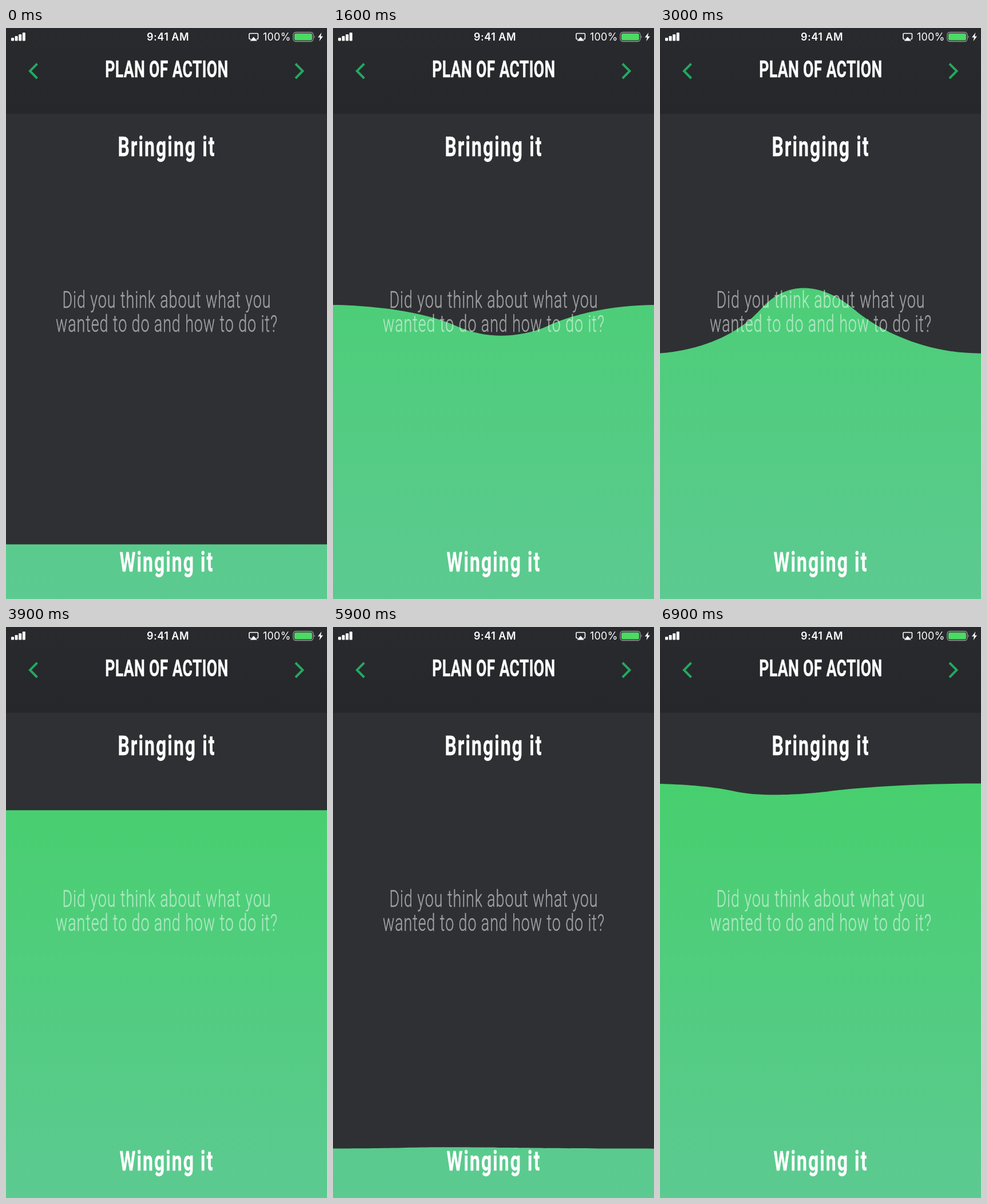
An HTML page that plays this animation: 561x998 px, repeating every 7 s.

```html
<!DOCTYPE html>
<html lang="en">
<head>
<meta charset="utf-8">
<title>Plan of action</title>
<style>
  html, body { margin: 0; width: 100%; height: 100%; overflow: hidden; background: #2f3033; }
  svg { display: block; width: 100vw; height: 100vh; }
  text { fill: #fff; text-anchor: middle; }
  .status { font: 400 18px Inter, sans-serif; letter-spacing: .2px; }
  .time { font-weight: 600; letter-spacing: .5px; }
  .label { font-family: Roboto, sans-serif; font-weight: 700; stroke: #fff; stroke-width: .4; }
  .title { font-size: 40.5px; letter-spacing: .5px; }
  .choice { font-size: 48.5px; letter-spacing: 3.2px; }
  .question { font-size: 41px; font-weight: 300; letter-spacing: 1.35px; opacity: .55; }
  .arrow { fill: none; stroke: #24a862; stroke-width: 4; }
</style>
</head>
<body>
<svg viewBox="0 0 561 998" preserveAspectRatio="none">
  <defs>
    <linearGradient id="green" gradientUnits="userSpaceOnUse" x1="0" y1="270" x2="0" y2="998">
      <stop offset="0" stop-color="#47cf6e"/>
      <stop offset="1" stop-color="#5cca91"/>
    </linearGradient>
    <linearGradient id="bar" x1="0" y1="0" x2="0" y2="1">
      <stop offset="0" stop-color="#292a2d"/>
      <stop offset="1" stop-color="#26272a"/>
    </linearGradient>
  </defs>

  <rect width="561" height="998" fill="url(#green)"/>
  <g id="under"></g>
  <path id="cover" fill="#2f3033"/>
  <rect width="561" height="150" fill="url(#bar)"/>
  <g id="over"></g>

  <path class="arrow" d="M54.500 62.500L42 75.200L54.500 88"/>
  <path class="arrow" d="M506 62.500L518.500 75.200L506 88"/>

  <g id="signal" fill="#fff"></g>
  <text class="status time" x="283" y="22">9:41 AM</text>
  <path d="M428 19.500H426.500Q425 19.500 425 18V11Q425 9.500 426.500 9.500H439Q440.500 9.500 440.500 11V18Q440.500 19.500 439 19.500H437.500" fill="none" stroke="#fff" stroke-width="1.600"/>
  <path d="M432.700 15.500L439 22.500H426.500Z" fill="#fff"/>
  <text class="status" x="473.300" y="22">100%</text>
  <rect x="502" y="7.500" width="35" height="16" rx="4.500" fill="none" stroke="#98999b" stroke-width="1.300"/>
  <rect x="504" y="9.500" width="31" height="12" rx="2.500" fill="#4cd964"/>
  <path d="M538.500 13Q541 15.500 538.500 18Z" fill="#98999b"/>
  <path d="M551.500 8L545 16.500H549L547.500 23L554 14.500H550Z" fill="#fff"/>
</svg>

<script>
const WIDTH = 561, MID = WIDTH / 2, LOOP = 7000, TICK = 100;
const CONDENSE = 0.657;
const NS = 'http://www.w3.org/2000/svg';
const $ = id => document.getElementById(id);

function add(parent, tag, attrs, content = '') {
  const el = document.createElementNS(NS, tag);
  for (const key in attrs) el.setAttribute(key, attrs[key]);
  el.textContent = content;
  $(parent).append(el);
}

// All display type shares one condensed style.
function label(parent, kind, y, content) {
  add(parent, 'text', {
    class: 'label ' + kind,
    transform: `translate(${MID + 0.5} ${y}) scale(${CONDENSE} 1)`
  }, content);
}

label('under', 'choice', 950, 'Winging it');
label('over', 'title', 86, 'PLAN OF ACTION');
label('over', 'choice', 224, 'Bringing it');
label('over', 'question', 489, 'Did you think about what you');
label('over', 'question', 531, 'wanted to do and how to do it?');

for (let i = 0; i < 4; i++) {
  const h = 5.5 + i * 3;
  add('signal', 'rect', { x: 9 + i * 6.6, y: 22.5 - h, width: 5, height: h, rx: 1.2 });
}

// Each swipe drags the edge half way, then lets it spring to its end.
const swipes = [
  { start: 550, release: 804, from: 902.5, to: 301, x: 235 },
  { start: 1150, release: 1740, from: 301, to: 727.5, x: 300 },
  { start: 2450, release: 3240, from: 727.5, to: 320, x: 250 },
  { start: 3880, release: 5130, from: 320, to: 915, x: 348 },
  { start: 5850, release: 6660, from: 915, to: 301, x: 191 }
];
const PULL_UP = 0.75, PULL_DOWN = 0.306, SETTLE = 0.36;

const smooth = u => u * u * (3 - 2 * u);

function spring(s) {
  if (s >= SETTLE) return 0;
  const decay = 7.7, speed = 11.1;
  return Math.exp(-decay * s) * (Math.cos(speed * s) + decay / speed * Math.sin(speed * s));
}

function pose(t) {
  const { start, release, from, to, x } = swipes.filter(s => s.start <= t).pop() || swipes[0];
  const half = (to - from) / 2;
  const pull = half < 0 ? PULL_UP : PULL_DOWN;
  if (t < release) {
    const moved = half * smooth(Math.max(0, (t - start) / (release - start)));
    return [from + moved, moved * pull, x];
  }
  const left = half * spring((t - release) / 1000);
  return [to - left, left * pull, x];
}

// Elastic edge that leans towards the finger.
function edge(base, wave, x) {
  const lean = (x - MID) * 0.28;
  const left = Math.min(lean, 0), right = WIDTH + Math.max(lean, 0);
  const fromLeft = k => left + (x - left) * k;
  const fromRight = k => right - (right - x) * k;
  const side = base + wave * 0.64, tip = base + wave * 1.36;
  const l = `${fromLeft(0.71)} ${side}`, r = `${fromRight(0.71)} ${side}`;
  return `M${left} 0V${base}` +
    `C${left} ${base} ${fromLeft(0.44)} ${base} ${l}` +
    `C${x} ${tip} ${r} ${r}` +
    `C${r} ${fromRight(0.44)} ${base} ${right} ${base}V0Z`;
}

const begin = performance.now();
function draw() {
  const t = (performance.now() - begin) % LOOP;
  $('cover').setAttribute('d', edge(...pose(Math.floor(t / TICK) * TICK)));
  requestAnimationFrame(draw);
}
draw();
</script>
</body>
</html>
```
